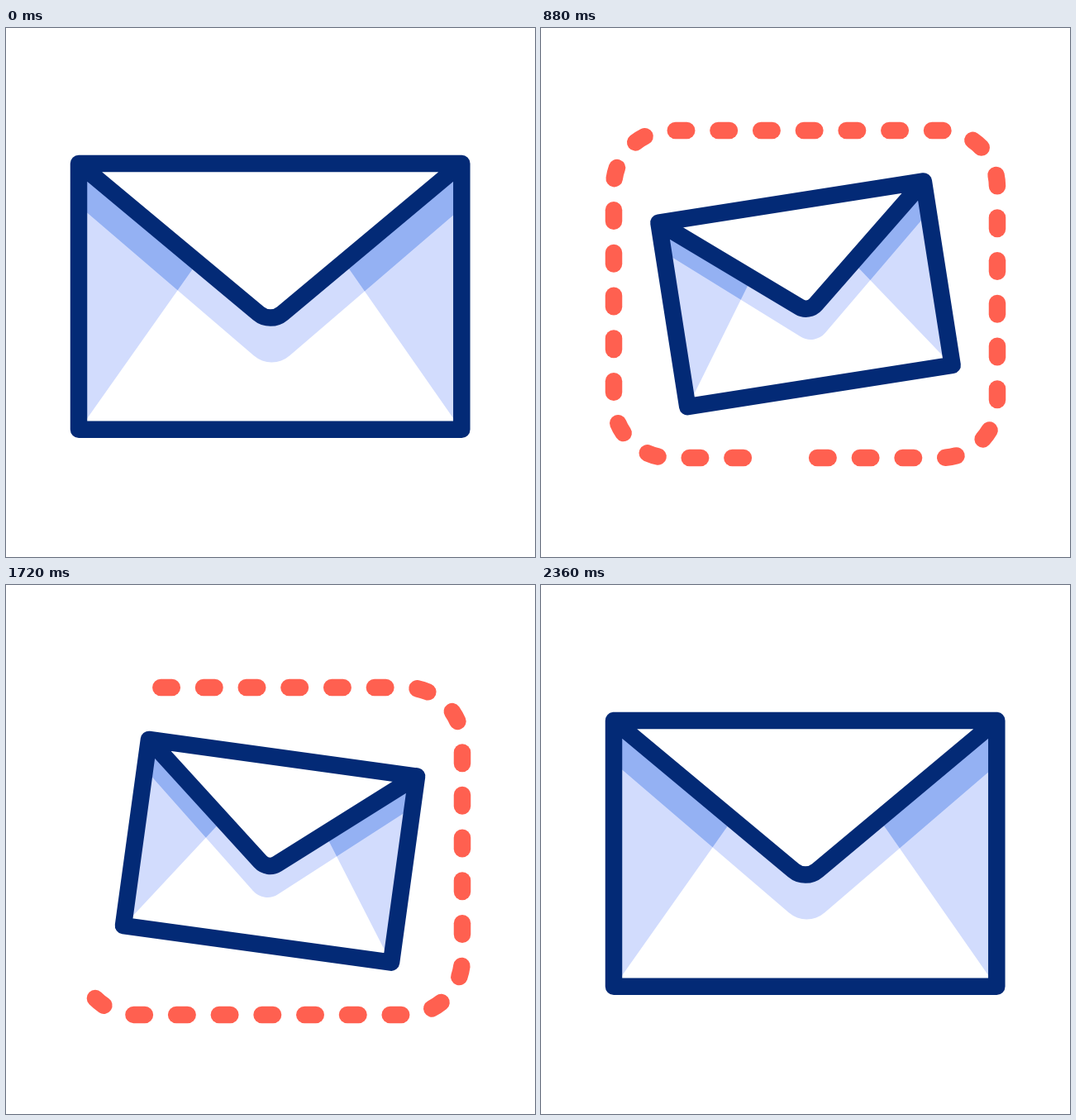
Recreate the animation shown at these times as an HTML page with a canvas. Size 640x640 px, loop 2.6 s.

```html
<!DOCTYPE html>
<html lang="en">
<head>
<meta charset="utf-8">
<title>Envelope</title>
<style>
  html, body { margin: 0; height: 100%; overflow: hidden; background: #fff; }
  canvas { display: block; width: 100%; height: 100%; }
</style>
</head>
<body>
<canvas id="stage" width="640" height="640"></canvas>
<script>
const ctx = document.getElementById('stage').getContext('2d');
const LOOP = 2600, STEP = 40;
const NAVY = '#032a76', CORAL = '#ff6050', LIGHT = '#d2dcfd', SHADE = '#94b1f3';

// Envelope frame and dashed track
const L = 88, R = 551.3, T = 164, B = 485.8;
const X0 = 88, X1 = 552, Y0 = 124, Y1 = 520, RAD = 68;
const LAP = 2 * (X1 - X0 + Y1 - Y0) - (8 - 2 * Math.PI) * RAD;
const PITCH = LAP / 31, DASH = 13.5;

const clamp = x => Math.min(1, Math.max(0, x));

// Progress along cubic-bezier(.4, 0, .36, 1)
function ease(t, start, length) {
  const x = clamp((t - start) / length);
  if (x === 0 || x === 1) return x;
  let lo = 0, hi = 1;
  for (let i = 0; i < 24; i++) {
    const u = (lo + hi) / 2, v = 1 - u;
    if (3 * u * v * v * 0.4 + 3 * u * u * v * 0.36 + u * u * u < x) lo = u; else hi = u;
  }
  return lo * lo * (3 - 2 * lo);
}

function drawTrail(t) {
  const turn = LAP / 4 * clamp((t - 80) / 1341);
  const tail = turn + LAP * ease(t, 1420, 1000);
  const head = turn + LAP * ease(t, 100, 1000);
  if (t >= 2360 || head <= tail) return;

  ctx.beginPath();
  ctx.moveTo(X1 - RAD, Y1);
  for (let lap = 0; lap < 2; lap++) {
    ctx.arcTo(X0, Y1, X0, Y0, RAD);
    ctx.arcTo(X0, Y0, X1, Y0, RAD);
    ctx.arcTo(X1, Y0, X1, Y1, RAD);
    ctx.arcTo(X1, Y1, X0, Y1, RAD);
  }
  ctx.strokeStyle = CORAL;
  ctx.lineCap = 'round';
  ctx.lineWidth = 20.5;
  for (let s = tail; s < head - 0.1; s += PITCH) {
    ctx.setLineDash([Math.min(DASH, head - s), 9999]);
    ctx.lineDashOffset = -s;
    ctx.stroke();
  }
  ctx.setLineDash([]);
}

function fill(path, color) {
  ctx.beginPath();
  path();
  ctx.fillStyle = color;
  ctx.fill();
}

function sides() {
  ctx.moveTo(L, T); ctx.lineTo(231.5, 283.5); ctx.lineTo(L, B + 1);
  ctx.moveTo(R, T); ctx.lineTo(409.5, 283.5); ctx.lineTo(R, B + 1);
}

function shadow() {
  ctx.moveTo(L, T);
  ctx.lineTo(L, 214.7);
  ctx.arcTo(321.5, 415, R, 217.8, 33);
  ctx.lineTo(R, 217.8);
  ctx.lineTo(R, T);
}

function flap() {
  ctx.moveTo(L, T);
  ctx.arcTo(320, 357.3, R, T, 22.5);
  ctx.lineTo(R, T);
}

function drawEnvelope(t) {
  const shrink = ease(t, 160, 680), swing = ease(t, 988, 600), back = ease(t, 1665, 591);
  const scale = 1 - 0.3 * (shrink - back);
  const angle = -8.9 * shrink + 16.9 * swing - 8 * back;

  ctx.save();
  ctx.translate(320, 320);
  ctx.rotate(angle * Math.PI / 180);
  ctx.translate(0, -5.5);
  ctx.scale(scale, scale);
  ctx.translate(-320, -314.5);

  fill(() => ctx.rect(L, T, R - L, B - T), '#fff');
  fill(sides, LIGHT);
  fill(shadow, LIGHT);
  ctx.save();
  ctx.beginPath();
  sides();
  ctx.clip();
  fill(shadow, SHADE);
  ctx.restore();
  fill(flap, '#fff');

  ctx.beginPath();
  ctx.rect(L, T, R - L, B - T);
  flap();
  ctx.restore();

  // The outline keeps its weight at every scale
  ctx.strokeStyle = NAVY;
  ctx.lineWidth = 20.5;
  ctx.lineJoin = 'round';
  ctx.stroke();
}

function draw(now) {
  const t = Math.floor(now % LOOP / STEP) * STEP;
  ctx.fillStyle = '#fff';
  ctx.fillRect(0, 0, 640, 640);
  drawTrail(t);
  drawEnvelope(t);
  requestAnimationFrame(draw);
}
requestAnimationFrame(draw);
</script>
</body>
</html>
```
